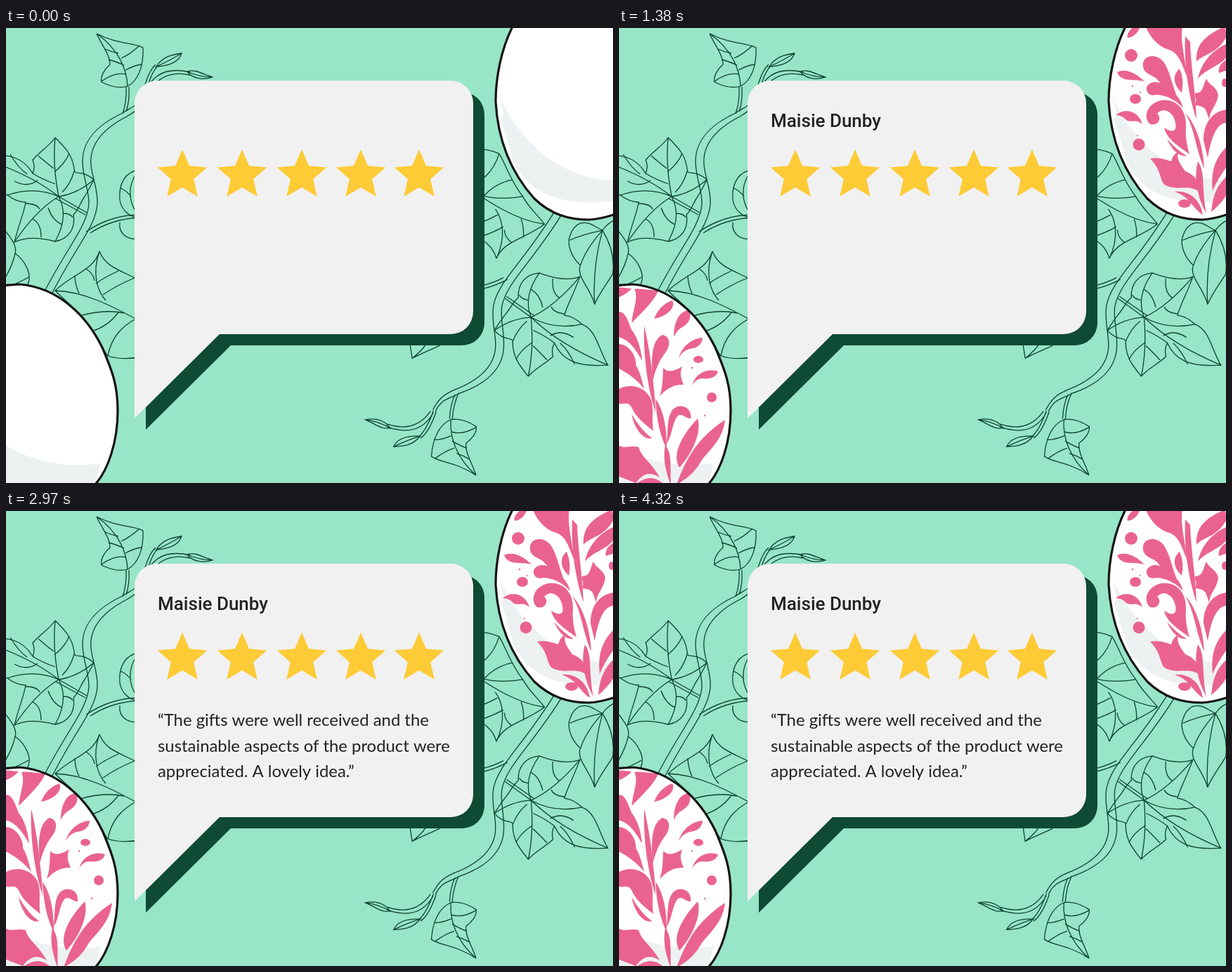
Write an HTML page with a canvas that moves like this. It is 864 px wide and 648 px high and loops after 4380 ms.

```html
<!DOCTYPE html>
<html lang="en">
<head>
<meta charset="utf-8">
<title>Customer review</title>
<style>
html, body { margin: 0; width: 100%; height: 100%; overflow: hidden; background: #98e5c8; }
canvas { display: block; width: 864px; height: 648px; }
</style>
</head>
<body>
<canvas id="stage" width="864" height="648"></canvas>
<script>
const ctx = document.getElementById('stage').getContext('2d');
const LOOP = 4380, EGG_PERIOD = 1800, POP = 60;
const clamp = v => Math.max(0, Math.min(1, v));
const dot = (x, y, r, ry = r) =>
  `M${x - r} ${y}a${r} ${ry} 0 1 0 ${2 * r} 0a${r} ${ry} 0 1 0 ${-2 * r} 0z`;

// Ivy, drawn once at the top left and once turned around at the bottom right.
const bud = `M129 8C136 24 148 38 148 52C141 58 134 68 136 77C146 82 160 87 173 83
  C188 75 196 55 195 28C180 20 160 24 129 8C160 30 172 58 173 83
  M171 66Q155 62 136 76M168 53Q155 47 146 45M160 36Q150 34 141 30
  M170 60Q185 52 194 52M164 43Q176 38 190 25M171 84Q172 105 166 122M175 84Q176 105 171 119`;
const tendrils = `M214 55C222 42 234 38 250 36C246 48 232 54 214 55Q230 48 250 36
  M216 54Q206 64 199 93M213 52Q202 62 195 92
  M258 62C270 58 280 66 294 70C282 74 266 73 258 62Q276 70 294 70
  M199 90Q215 52 262 63M203 92Q222 58 262 67`;
const stems = `M196 92C190 112 176 113 166 121C130 138 108 160 109 192C110 215 118 230 118 250
  C116 285 80 320 45 395M200 94C193 112 186 118 172 126C145 140 118 162 121 195
  C123 215 131 230 130 250C128 285 95 315 57 395
  M114 290Q150 266 190 266M120 292Q150 272 190 270`;
const sideLeaf = `M190 202C170 204 160 222 162 245C165 262 180 272 190 268
  M162 277C160 292 172 303 190 300M185 208C174 225 174 245 185 262M163 228Q172 232 178 240
  M245 194L237 164C225 172 214 178 200 186M237 164Q222 178 215 195`;
const ivyLeaf = `M70 156C62 168 48 176 38 188C41 195 41 200 38 207C25 185 5 176 -41 184
  C-25 205 -20 232 2 238C10 244 20 248 28 248C26 262 18 280 12 305
  C30 296 55 300 70 304C90 300 99 285 96 266C104 258 106 248 112 240Q118 230 125 216
  C108 200 96 212 97 200C94 180 84 170 70 156`;
const ivyVeins = `M70 156Q66 195 75 240Q102 236 125 216M75 240Q30 205 -41 184
  M75 240Q40 225 2 238M75 240Q42 260 12 305M75 240Q90 268 70 304
  M75 240L115 263M71 243L113 266M68 200Q55 190 46 182M69 205Q85 192 90 178
  M70 222Q50 215 38 207M80 234Q92 222 97 204M45 217Q30 228 12 218M30 208Q18 200 6 180
  M48 258Q44 250 28 250M38 272Q50 278 50 298M81 264Q92 264 95 270M80 280Q66 274 60 256`;
const broadLeaf = `M133 318C125 345 95 350 70 374C80 385 95 395 105 410
  C125 430 135 455 145 467C160 472 175 472 195 468M133 318C142 342 165 345 195 362
  M70 374C110 375 150 395 195 420M133 318C122 350 130 375 142 388
  M105 410Q140 400 168 406M145 467C150 440 165 425 185 414M98 352Q98 365 104 378
  M114 343Q125 350 126 360M160 346Q140 355 128 364M183 356Q158 366 138 380M122 432Q145 425 160 405`;
const edgeLeaf = `M-13 268C-5 290 18 305 13 321C28 332 36 350 32 362C30 372 25 378 19 381
  C5 385 0 378 -13 374M-13 268C-18 285 -28 300 -34 314C-45 330 -45 355 -40 370
  M-13 374Q-4 320 -13 268M-13 374Q8 345 13 321M-13 374Q15 365 32 355
  M-13 374Q-35 345 -34 314M-13 374Q-22 390 -40 395`;
const ivy = [bud, tendrils, stems, sideLeaf, ivyLeaf, ivyVeins, broadLeaf, edgeLeaf]
  .map(d => new Path2D(d));

// Each ornament is a list of growth stages, lowest part of the plant first.
const STAGES = [[130, 270], [290, 510], [520, 690], [700, 960]];
const rightStages = [[
  'M831 266C815 255 812 240 791 233C812 231 828 245 831 266z',
  'M836 264C825 245 817 215 824 190C835 205 829 230 836 264z',
  'M843 262C845 240 850 225 866 210V235Q858 250 843 262z',
  'M845 232C842 205 848 185 866 168V196Q852 215 845 232z',
  dot(805, 250, 9, 6),
  'M828 234C810 222 800 232 780 225C768 220 775 205 756 186C765 184 775 186 786 190C788 183 790 180 796 176C793 188 800 195 806 204C820 210 826 218 828 234z',
  dot(740, 166, 8.5),
  'M808 182Q792 184 780 158Q794 174 808 182z',
  'M812 180C800 170 780 160 776 142C785 148 795 150 792 135C789 118 774 112 766 122C772 126 770 140 756 137C746 128 750 108 772 103C795 100 808 118 807 140C806 155 808 165 812 180z',
  'M745 137C735 128 730 136 722 131Q716 124 707 124C720 113 740 118 745 137z' + dot(738, 153, 1)
], [
  'M833 200C820 170 820 145 806 121C824 140 832 175 833 200z',
  'M838 185L832 160C832 135 845 118 866 116V135Q846 134 838 185z',
  'M840 130C835 118 838 112 820 110C824 100 818 98 820 93C832 92 830 85 836 72C840 82 852 84 853 96C850 112 842 115 840 130z',
  'M854 64C852 58 857 48 866 45V60z',
  dot(862, 78, 4, 6)
], [
  'M803 114C792 102 780 96 765 95C755 98 750 92 751 84C758 72 775 76 786 90Q799 98 803 114z',
  dot(735, 101, 8, 7),
  'M796 102C785 88 772 82 765 72C758 66 744 65 746 50C748 38 765 36 775 48C785 62 788 85 796 102z',
  'M748 76C732 72 715 78 709 63C722 56 738 66 748 76z' + dot(731, 83, 1.2) + dot(742, 92, 1),
  dot(729, 39, 9)
], [
  'M822 130C810 95 804 50 806 12L813 20C814 55 821 95 822 130z',
  'M824 72C830 45 848 30 866 22V40C855 55 835 58 824 72z',
  'M801 92C788 80 788 66 798 58Q805 74 801 92z',
  'M822 48C820 20 840 8 862 -2L866 10C852 38 832 36 822 48z',
  'M809 70C800 50 798 35 780 30C768 26 756 14 750 -2H802C798 15 806 45 809 70z',
  'M724 14C722 8 728 2 733 -2H742Q736 13 724 14z'
]];
const leftStages = [[
  'M66 652Q48 632 26 648z',
  'M74 652C66 630 62 612 66 594C77 608 72 630 74 652z',
  'M58 640C40 628 30 640 24 648L-2 638V594C8 600 20 594 28 597C32 612 46 618 58 640z',
  'M82 650C95 615 110 585 151 558C148 585 130 600 118 615Q106 638 82 650z',
  'M86 626C76 610 85 585 112 556C118 575 105 605 86 626z',
  'M47 584C36 588 22 572 18 550Q32 574 47 584z',
  'M49 574C38 565 24 555 18 540C12 530 5 538 -2 534V515C15 505 38 510 46 530C50 545 46 560 49 574z',
  dot(122, 552, 1.2)
], [
  'M68 600C58 580 53 555 52 528C64 545 68 570 68 600z',
  'M68 592C70 570 68 552 78 542C88 534 104 540 102 556C94 556 90 548 84 552C76 560 76 580 68 592z',
  'M58 524C62 512 62 505 63 484C70 492 80 488 90 482C86 492 88 498 92 508C80 508 72 510 58 524z',
  dot(132, 526, 7),
  'M104 510C108 492 125 484 141 489C138 500 125 500 118 499Q108 500 104 510z',
  dot(113, 472, 7, 5),
  'M85 470C90 452 105 442 119 441C118 452 110 456 100 457Q90 460 85 470z' + dot(104, 484, 1.2)
], [
  'M52 548C44 520 41 500 42 474C49 500 51 520 52 548z',
  'M36 514C25 500 10 490 -2 484V450C15 450 25 468 24 480C30 490 32 500 36 514z'
], [
  'M50 540C40 510 34 460 36 424C44 460 50 500 50 540z',
  'M48 502C46 475 45 445 62 437C75 440 73 455 64 465Q54 478 48 502z',
  'M33 474C20 450 10 442 -2 440V405C8 400 14 420 18 430Q30 445 33 474z',
  'M78 440C78 420 85 405 97 402C106 408 100 420 92 425Q82 430 78 440z',
  'M50 414Q58 394 76 388C82 400 64 412 50 414z',
  'M18 420C20 400 28 385 22 372C35 370 50 376 57 372C50 388 40 398 18 420z',
  'M-2 384V369L18 371Q10 380 -2 384z'
]];

const schedule = stages => stages.flatMap((shapes, s) => {
  const [from, to] = STAGES[s];
  return shapes.map((d, i) => {
    const [x, y] = d.match(/-?[\d.]+/g).map(Number);
    return { path: new Path2D(d), x, y, done: from + (to - from) * (i + 1) / shapes.length };
  });
});

const makeEgg = (outline, shade, stages) => ({
  outline: new Path2D(outline), shade: new Path2D(shade), ornament: schedule(stages)
});
const eggs = [
  makeEgg('M-10 367L20 365C75 370 115 410 137 455C152 490 159 510 159 545C159 590 145 630 127 650L-10 660z',
    'M-5 591C30 615 80 628 135 620L127 650H-5z', leftStages),
  makeEgg('M721 -2C705 30 697 70 697 105C700 160 718 205 752 243C775 265 800 273 830 273Q848 272 870 264V-5z',
    'M702 96C725 150 780 215 866 217V246C800 255 745 240 722 190Q712 150 704 130L709 125z', rightStages)
];

const bubble = new Path2D(`M215 75H633A32 32 0 0 1 665 107V404A32 32 0 0 1 633 436
  H304L183 556V107A32 32 0 0 1 215 75z`);

const star = new Path2D();
for (let i = 0; i < 10; i++) {
  const r = i % 2 ? 17 : 37, a = i * Math.PI / 5 - Math.PI / 2;
  star.lineTo(r * Math.cos(a), r * Math.sin(a));
}
star.closePath();

const NAME = 'Maisie Dunby';
const QUOTE = ['“The gifts were well received and the',
  'sustainable aspects of the product were', 'appreciated. A lovely idea.”'];

// Use the slimmest face on hand, at the size that fills the given measure.
const faces = ['Noto Sans', 'Open Sans', 'Roboto', 'Lato', 'Liberation Sans Narrow'];
function fitFont(text, width, weight) {
  const font = (size, face) => `${weight} extra-condensed ${size}px "${face}", sans-serif`;
  const measured = faces.map(face => {
    ctx.font = font(100, face);
    return { face, w: ctx.measureText(text).width };
  }).sort((a, b) => a.w - b.w)[0];
  return font(100 * width / measured.w, measured.face);
}
const nameFont = fitFont(NAME, 157, 500);
const quoteFont = fitFont(QUOTE[1], 416, 400);

function drawIvy() {
  ctx.strokeStyle = '#0d4433';
  ctx.lineWidth = 1.3;
  ivy.forEach(p => ctx.stroke(p));
  ctx.save();
  ctx.translate(669, 637);
  ctx.rotate(186.1 * Math.PI / 180);
  ctx.translate(-129, -8);
  ivy.forEach(p => ctx.stroke(p));
  ctx.restore();
}

function drawEgg(egg, phase) {
  ctx.save();
  ctx.clip(egg.outline);
  ctx.fillStyle = '#fff';
  ctx.fill(egg.outline);
  ctx.fillStyle = '#edf1f2';
  ctx.fill(egg.shade);
  ctx.fillStyle = '#ea6390';
  for (const { path, x, y, done } of egg.ornament) {
    const k = clamp((phase - done + POP) / POP);
    if (!k) continue;
    ctx.save();
    ctx.translate(x, y);
    ctx.scale(k, k);
    ctx.translate(-x, -y);
    ctx.fill(path);
    ctx.restore();
  }
  ctx.restore();
  ctx.strokeStyle = '#141414';
  ctx.lineWidth = 3.2;
  ctx.stroke(egg.outline);
}

function drawBubble() {
  ctx.save();
  ctx.translate(16, 16);
  ctx.fillStyle = '#0f4a35';
  ctx.fill(bubble);
  ctx.restore();
  ctx.fillStyle = '#f1f1f1';
  ctx.fill(bubble);
  ctx.fillStyle = '#fdcb36';
  for (const x of [251, 336, 421, 505, 588]) {
    ctx.save();
    ctx.translate(x, 210);
    ctx.fill(star);
    ctx.restore();
  }
}

function drawText(t) {
  ctx.fillStyle = '#222';
  ctx.font = nameFont;
  ctx.textBaseline = 'middle';
  ctx.fillText(NAME.slice(0, Math.floor(t / 110)), 216, 133);
  ctx.font = quoteFont;
  ctx.textBaseline = 'alphabetic';
  ctx.globalAlpha = 1 - (1 - clamp((t - 1680) / 770)) ** 1.7;
  QUOTE.forEach((line, i) => ctx.fillText(line, 216, 306 + 36.5 * i));
  ctx.globalAlpha = 1;
}

// The last growth is cut short by the loop, so it hurries after its start.
function eggPhase(t) {
  const u = t % EGG_PERIOD;
  return t >= 2 * EGG_PERIOD && u > 270 ? 270 + (u - 270) * 1.6 : u;
}

const start = performance.now();
function frame() {
  const t = (performance.now() - start) % LOOP;
  ctx.fillStyle = '#98e5c8';
  ctx.fillRect(0, 0, 864, 648);
  drawIvy();
  const phase = eggPhase(t);
  eggs.forEach(egg => drawEgg(egg, phase));
  drawBubble();
  drawText(t);
  requestAnimationFrame(frame);
}
frame();
</script>
</body>
</html>
```
